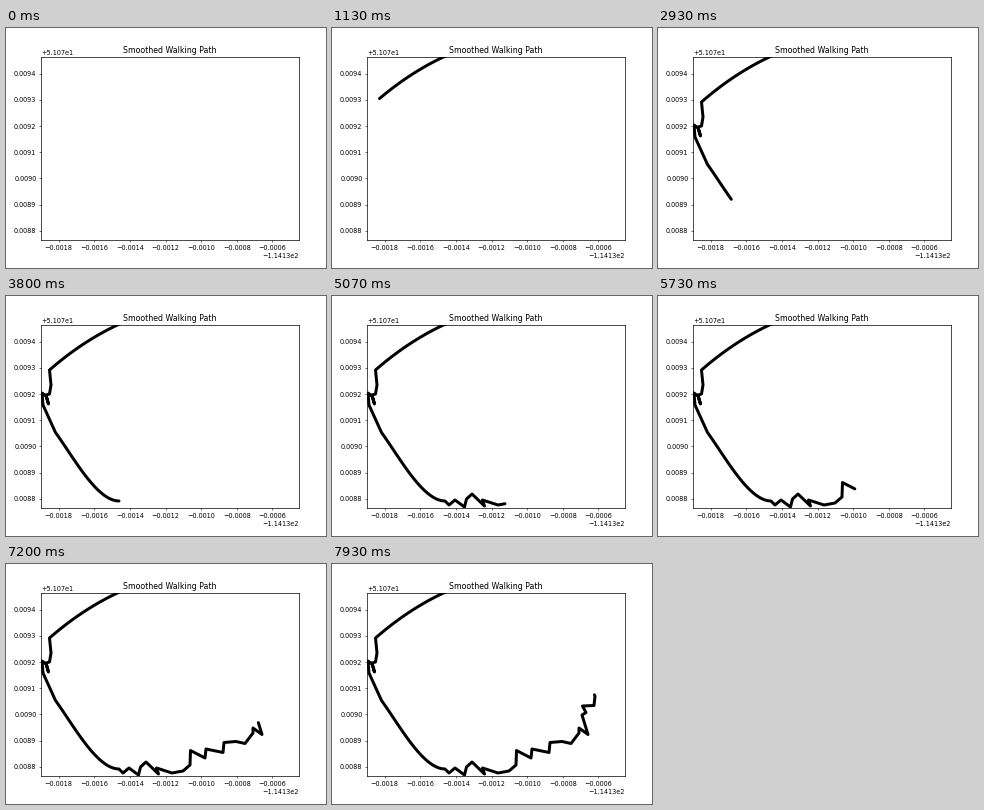
Animation of 320 by 240 pixels, one loop 8000 ms. Source, as a matplotlib script:

```python
import numpy as np
import matplotlib.pyplot as plt
from matplotlib.animation import FuncAnimation
from matplotlib.transforms import IdentityTransform

W, H = 320, 240
FRAMES, LOOP_MS = 120, 8000
LEFT, RIGHT, TOP, BOTTOM = 35, 293, 29, 212
SCALE = 0.94

plt.rcParams.update({
    "font.family": "DejaVu Sans",
    "font.size": 10 * SCALE,
    "axes.titlesize": 12 * SCALE,
    "axes.titlepad": 6 * SCALE,
    "axes.linewidth": 1.0,
})
for axis in "xy":
    plt.rcParams.update({
        f"{axis}tick.major.size": 3.5 * SCALE,
        f"{axis}tick.major.pad": 3.5 * SCALE,
    })


def bezier(*ctrl, n=24):
    """Points on the Bezier curve of any degree (de Casteljau)."""
    t = np.linspace(0, 1, n)[:, None, None]
    p = np.array(ctrl, float)[None].repeat(n, axis=0)
    while p.shape[1] > 1:
        p = (1 - t) * p[:, :-1] + t * p[:, 1:]
    return p[:, 0]


# Stretches of the walk: (step of arrival, corners or curve)
WALK = [
    (17, bezier((118, 26), (79, 43), (43.5, 74))),
    (32, [(45, 89), (43.5, 98), (40, 99), (42.5, 108), (40, 100),
          (36, 97), (37, 109), (49.5, 136.5)]),
    (57, bezier((49.5, 136.5), (68, 162), (91, 205), (113, 205))),
    (96, [(117, 209), (123, 204), (132.5, 211), (134.5, 203), (140, 198),
          (152.5, 210), (150.5, 204), (166, 209), (177, 207), (184, 201),
          (184.5, 186.5), (199, 194), (200, 185), (217, 188.5),
          (218, 178.5), (230, 177.5)]),
    (119, [(239, 179.5), (247, 169), (247, 164), (256, 170.5), (250, 151),
           (254, 148.5), (250.5, 142), (262, 141.5), (263, 132),
           (260.5, 127)]),
]


def timed_walk():
    """Path vertices and when each is reached, at an even pace per stretch."""
    pts, steps = [WALK[0][1][0]], [0.0]
    for end, stretch in WALK:
        xy = np.array([pts[-1], *stretch], float)
        dist = np.cumsum(np.hypot(*np.diff(xy, axis=0).T))
        steps.extend(steps[-1] + (end - steps[-1]) * dist / dist[-1])
        pts.extend(xy[1:])
    return np.array(pts), np.array(steps)


def lon(x):
    return -114.1318 + (x - 52.7) / 35.6 * 0.0002


def lat(y):
    return 51.0794 - (y - 45.8) / 26.17 * 0.0001


path, reached = timed_walk()
px, py = path[:, 0], H - path[:, 1]

fig = plt.figure(figsize=(6.4, 4.8), dpi=50, facecolor="white")
ax = fig.add_axes([LEFT / W, 1 - BOTTOM / H,
                   (RIGHT - LEFT) / W, (BOTTOM - TOP) / H])
ax.set_title("Smoothed Walking Path")
ax.set_xticks(-114.1318 + 0.0002 * np.arange(7))
ax.set_yticks(51.0788 + 0.0001 * np.arange(7))
ax.set_xlim(lon(LEFT), lon(RIGHT))
ax.set_ylim(lat(BOTTOM), lat(TOP))

line, = ax.plot([], [], color="black", lw=4.3, solid_capstyle="round",
                solid_joinstyle="round", transform=IdentityTransform())


def draw(step):
    done = reached < step
    line.set_data(np.append(px[done], np.interp(step, reached, px)),
                  np.append(py[done], np.interp(step, reached, py)))
    return line,


anim = FuncAnimation(fig, draw, frames=FRAMES, interval=LOOP_MS / FRAMES,
                     repeat=True, repeat_delay=0)
plt.show()
```
